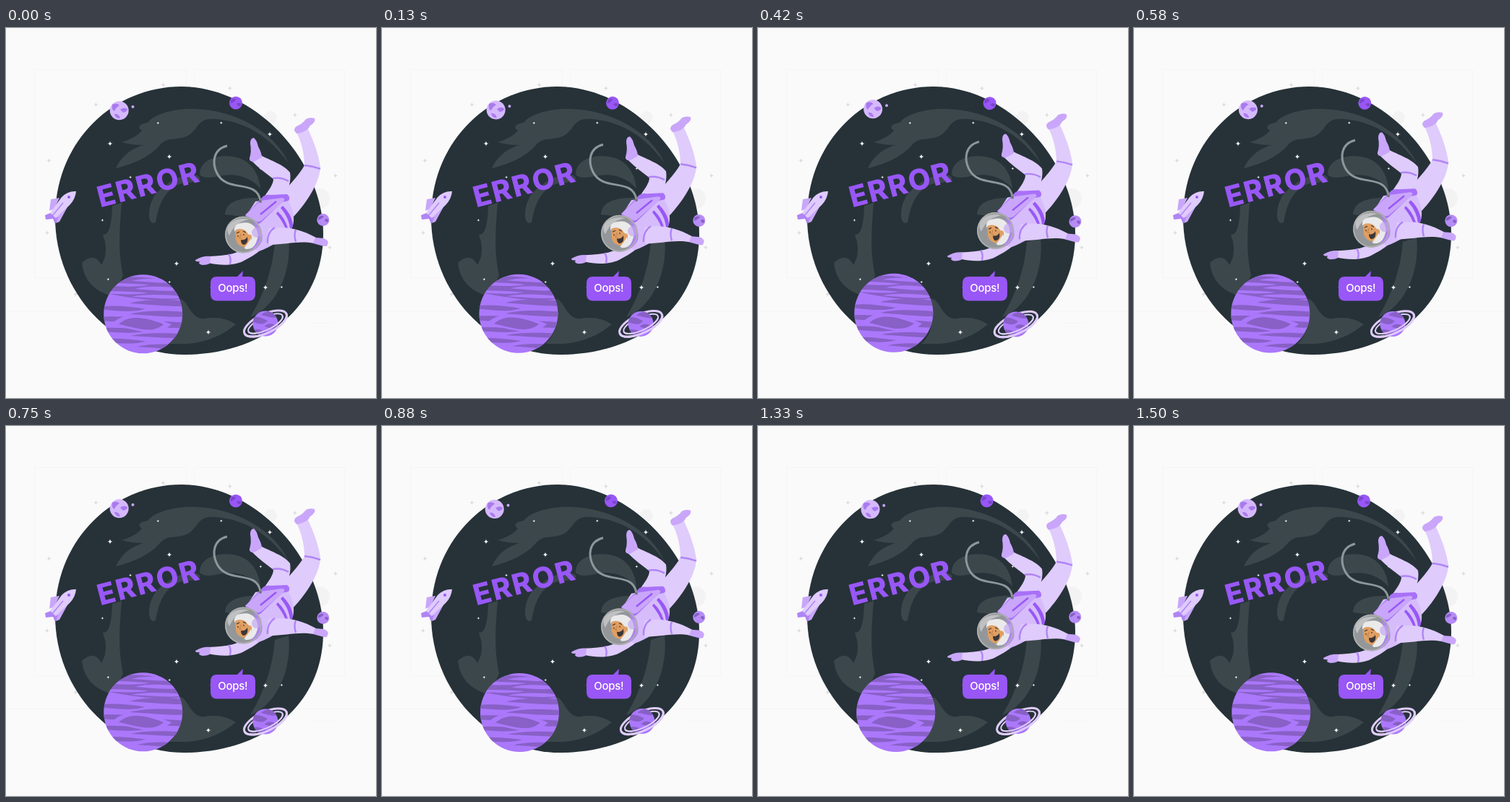
Animation of 512x512 px, one loop 1.54 s. Source, as an HTML page:

```html
<!DOCTYPE html>
<html lang="en">
<head>
<meta charset="utf-8">
<title>Lost in space</title>
<style>
  html, body { margin: 0; width: 100%; height: 100%; overflow: hidden; background: #fafafa; }
  svg { display: block; width: 100vw; height: 100vh; }
  text { font-family: Inter, Lato, sans-serif; }
  .suit { fill: #dfcbfc; }
  .mid { fill: #c9a6fa; }
  .deep { fill: #9857f6; }
  .line { fill: none; stroke: #b084f5; stroke-width: 2.4; }
  .light { fill: #ab78fb; }
  .shade { fill: #8860c6; }
</style>
</head>
<body>
<svg viewBox="0 0 512 512">
  <defs>
    <path id="blob" d="M243 81C345 81 439 183 439 285S355 452 246 452C148 452 68 366 68 262S147 81 243 81Z"/>
    <clipPath id="space"><use href="#blob"/></clipPath>
    <clipPath id="giant"><circle cx="189.7" cy="395.8" r="54.5"/></clipPath>
    <clipPath id="ringed"><circle cx="359" cy="409" r="17.5"/></clipPath>
  </defs>

  <rect width="512" height="512" fill="#fafafa"/>
  <path fill="none" stroke="#f5f5f5" d="M39.5 57.5H249.5V346H39.5ZM260.5 57.5H468.5V346H260.5ZM0 391.5H512M422 408.5H454"/>
  <g fill="#f3f3f3"><circle cx="366" cy="124" r="9"/><circle cx="434" cy="236" r="14"/></g>
  <g id="paleStars" fill="#dedede"></g>

  <use href="#blob" fill="#263238"/>
  <g fill="#3c474c" clip-path="url(#space)">
    <path d="M152 194Q163 170 190 162Q174 162 160 158Q180 152 188 142Q178 134 196 131C206 118 235 111 262 112C320 114 372 145 391 187C365 150 330 129 290 126C264 124 268 139 252 149C235 157 225 149 213 162C198 180 170 190 152 194Z"/>
    <path d="M105 325Q122 309 132 328Q143 310 134 286Q146 288 147 246L160 242C156 290 156 315 162 342L150 372Q109 362 105 325Z"/>
    <path d="M207 269C196 275 194 248 207 230C224 210 250 200 264 204C276 210 262 214 243 215C219 223 211 245 207 269Z"/>
    <path d="M268 203C268 182 292 175 315 178C338 182 350 200 352 222C338 206 318 201 300 204C286 207 274 209 268 203Z"/>
    <path d="M303 258Q304 234 350 235L336 262Z"/>
    <path d="M372 296L391 290C396 335 376 385 338 400Q368 350 372 296Z"/>
    <path d="M238 375C252 372 254 405 275 402Q300 398 318 410Q290 434 250 437H226Q247 420 238 375Z"/>
  </g>
  <g id="stars" fill="#fff"></g>

  <g>
    <path class="mid" d="M62 237L74 235L67 250L60 253Z"/>
    <path class="mid" d="M87 244L74 268L69 270L71 259Z"/>
    <path fill="#b084f5" d="M54 259L64 255L72 262L68 271L65 264L55 265Z"/>
    <path class="suit" d="M97 226Q86 225 77 234L61 256L69 263L88 245Q96 237 97 226Z"/>
    <path class="line" style="stroke-width:1.5" d="M79 242L63 261"/>
    <circle class="deep" cx="87" cy="234" r="2"/>
  </g>

  <text transform="translate(130.5 248.5) rotate(-14.6)" font-size="40" font-weight="800" letter-spacing="2.2" fill="#9857f6">ERROR</text>

  <g id="planets">
    <circle class="light" cx="189.7" cy="395.8" r="54.5"/>
    <g id="bands" clip-path="url(#giant)"></g>

    <circle cx="156.7" cy="114.3" r="13" fill="#d5b8fc"/>
    <path fill="#a97aee" d="M147 106Q153 103 157 107Q152 110 150 115Q146 114 147 106ZM158 113Q163 109 168 112Q168 116 162 117ZM150 119Q156 118 158 125Q152 126 150 119Z"/>
    <circle cx="175.5" cy="109" r="2" class="mid"/>

    <circle cx="318" cy="103.7" r="9" class="deep"/>
    <path fill="#7b45cb" d="M311 100Q315 96 318 99Q316 103 311 104ZM319 105Q324 102 326 106Q322 111 319 105Z"/>

    <circle cx="438.8" cy="265.5" r="8.5" fill="#b68cf5"/>
    <path class="shade" d="M432 262Q437 258 440 261Q437 264 432 266ZM441 265Q446 262 446 268Q442 270 441 265Z"/>

    <g fill="none" stroke="#dfcbfc" transform="rotate(-25 359 409)">
      <ellipse cx="359" cy="409" rx="32" ry="13" stroke-width="3"/>
      <ellipse cx="359" cy="409" rx="26" ry="9" stroke-width="2"/>
    </g>
    <circle class="light" cx="359" cy="409" r="17.5"/>
    <g id="smallBands" clip-path="url(#ringed)"></g>
    <g fill="none" stroke="#dfcbfc" transform="rotate(-25 359 409)">
      <path stroke-width="3" d="M327 409A32 13 0 0 0 391 409"/>
      <path stroke-width="2" d="M333 409A26 9 0 0 0 385 409"/>
    </g>
  </g>

  <g id="astronaut">
    <path class="suit" d="M402 144L417 138C426 157 433 176 435 193C434 214 416 242 398 261L378 236C388 220 406 204 413 190C413 175 409 158 402 144Z"/>
    <path class="mid" d="M427 125Q429 130 421 135Q417 144 402 146Q396 140 402 136Q411 132 415 126Q421 123 427 125Z"/>
    <path class="line" d="M413 190Q424 191 435 195"/>

    <path class="suit" d="M340 184L352 176C366 183 386 190 393 200C395 211 391 224 384 238L357 234C364 224 370 216 370 209C361 202 350 194 340 184Z"/>
    <path class="mid" d="M343 152Q347 155 349 164Q354 173 354 179L343 185Q336 185 337 180Q340 171 338 160Q338 152 343 152Z"/>
    <path class="line" d="M369 208Q381 206 391 212"/>

    <path class="suit" d="M338 300C324 312 306 315 281 316L280 325C300 330 320 328 331 321C345 314 354 307 358 299L350 286Z"/>
    <path class="mid" d="M283 316Q272 315 262 321Q262 324 268 323Q265 327 272 328Q278 328 282 326Z"/>
    <path class="line" d="M308 313Q312 318 310 327"/>

    <path fill="#d6bcfb" d="M345 240L386 233C397 247 401 264 396 276C384 292 367 303 350 309C341 308 336 288 331 262Z"/>
    <path class="deep" d="M383 246Q397 260 397 275L393 278Q392 263 380 249Z"/>
    <path class="deep" d="M376 254Q386 263 390 277L387 278Q382 266 374 257Z"/>
    <path class="suit" d="M364 277C388 274 407 278 429 290L426 298C405 294 387 300 364 300Q359 290 364 277Z"/>
    <path class="mid" d="M428 290L440 291Q448 295 445 299Q445 304 436 301L425 298Z"/>
    <path class="line" d="M372 276Q361 283 362 298M401 279Q398 286 401 296"/>

    <path fill="#a871f8" d="M354 235Q358 230 366 231L389 230Q394 234 391 239L382 241L352 270Q343 274 337 266L331 259Z"/>
    <path class="mid" d="M352 239L382 235Q388 236 383 241L354 266Q348 271 341 264L331 259Z"/>
    <path class="line" style="stroke:#9857f6" d="M374 240L352 258"/>
    <path fill="none" stroke="#8c969b" stroke-width="3" d="M306 163C286 168 285 187 292 201C306 229 347 208 352 239"/>
    <circle cx="352" cy="240" r="2" fill="#6e777c"/>

    <circle cx="328.5" cy="286" r="25.5" fill="#94979a"/>
    <path fill="#b084f5" d="M343 267Q357 277 354 295Q349 306 339 309Q348 293 343 267Z"/>
    <path fill="#c4c5c5" d="M307 274Q318 260 337 265Q318 267 309 287Q305 282 307 274Z"/>
    <path fill="#f4f4f4" d="M316 281Q315 271 325 270Q337 267 344 275Q352 285 346 297Q342 307 331 306L333 289Z"/>
    <path fill="#e8a05b" d="M317 280Q323 276 331 280L336 286Q341 285 340 292Q338 301 330 303Q320 302 318 293Z"/>
    <path fill="#f4f4f4" d="M339 291Q342 302 329 305Q335 298 339 291Z"/>
    <path fill="#352b2b" d="M325 293Q331 294 334 289Q336 298 329 300Q325 299 325 293Z"/>
    <path fill="none" stroke="#352b2b" stroke-width="1.2" d="M319 284L323 282M328 281L332 283M321 287V289M329 285V287"/>
    <path fill="none" stroke="#c87b3f" d="M325 285L323 291L326 291"/>
    <circle cx="347" cy="283" r="7" fill="#c9a6fa" opacity=".65"/>
    <circle cx="328.5" cy="286" r="24.5" fill="#94979a" fill-opacity=".1" stroke="#b0b1b0" stroke-width="1.6"/>
  </g>

  <path class="deep" d="M292 344H320L328 336L327 344H336Q345 344 345 353V368.5Q345 377.500 336 377.500H292Q283 377.500 283 368.500V353Q283 344 292 344Z"/>
  <text x="313.7" y="365" font-size="15" font-weight="500" letter-spacing="-.3" text-anchor="middle" fill="#fff">Oops!</text>
</svg>
<script>
  const LOOP = 1540, CYCLE = 1500;
  const $ = id => document.getElementById(id);

  let seed = 7;
  const random = (low, high) => {
    seed = seed * 16807 % 2147483647;
    return low + (high - low) * seed / 2147483647;
  };
  const repeat = (count, draw) => Array.from({ length: count }, (_, i) => draw(i)).join("");

  const sparkle = (x, y, r) =>
    `<path d="M${x} ${y - r}Q${x} ${y} ${x + r} ${y}Q${x} ${y} ${x} ${y + r}Q${x} ${y} ${x - r} ${y}Q${x} ${y} ${x} ${y - r}Z"/>` +
    `<circle cx="${x}" cy="${y}" r="${r / 3}"/>`;

  // Tapered wavy stripe centred on x, y
  const band = (x, y, w, h, tone = "shade") =>
    `<path class="${tone}" d="M${x - w} ${y}C${x - w / 2} ${y - h * 1.6} ${x + w / 4} ${y - h} ${x + w} ${y}` +
    `C${x + w / 2} ${y + h * 1.6} ${x - w / 4} ${y + h * 0.5} ${x - w} ${y}Z"/>`;

  // Stripes that alternate between the left and right half of a planet
  const stripes = (count, x, top, step, spread, tone) => repeat(count, i =>
    band(x + (i % 2 ? -spread : spread), top + i * step, random(1, 1.6) * spread, random(0.4, 0.7) * step, tone));

  $("paleStars").innerHTML = repeat(9, i => {
    const angle = (147 + 28 * i) * Math.PI / 180, radius = 200 - 12 * Math.cos(1.4 * i);
    return sparkle(254 + radius * Math.cos(angle), 266 + radius * Math.sin(angle), 4);
  });

  const bright = [[144, 160], [226, 178], [365, 147], [236, 326], [359, 359], [280, 421]];
  $("stars").innerHTML = bright.map(([x, y]) => sparkle(x, y, 4)).join("") +
    repeat(10, i => {
      const angle = i * Math.PI / 5, radius = random(70, 165);
      return sparkle(254 + radius * Math.cos(angle), 266 + radius * Math.sin(angle), 2);
    });

  $("bands").innerHTML =
    band(190, 362, 85, 18) + stripes(5, 185, 350, 5.5, 28, "light") +
    stripes(9, 190, 381, 7.5, 34) +
    band(187, 410, 42, 13, "light") + band(187, 410, 31, 9);
  $("smallBands").innerHTML = stripes(4, 358, 397, 8, 9);

  const start = performance.now();
  function draw(now) {
    const p = Math.min(1, Math.max(0, now - start) % LOOP / CYCLE);
    const tilt = p < 0.25 ? 4 * p : p < 0.75 ? 2 - 4 * p : 4 * p - 4;
    const lift = 10 * (1 - Math.abs(1 - 2 * p));
    $("planets").setAttribute("transform", `rotate(${tilt} 291 272)`);
    $("astronaut").setAttribute("transform", `translate(0 ${-lift})`);
    requestAnimationFrame(draw);
  }
  draw(start);
</script>
</body>
</html>
```
